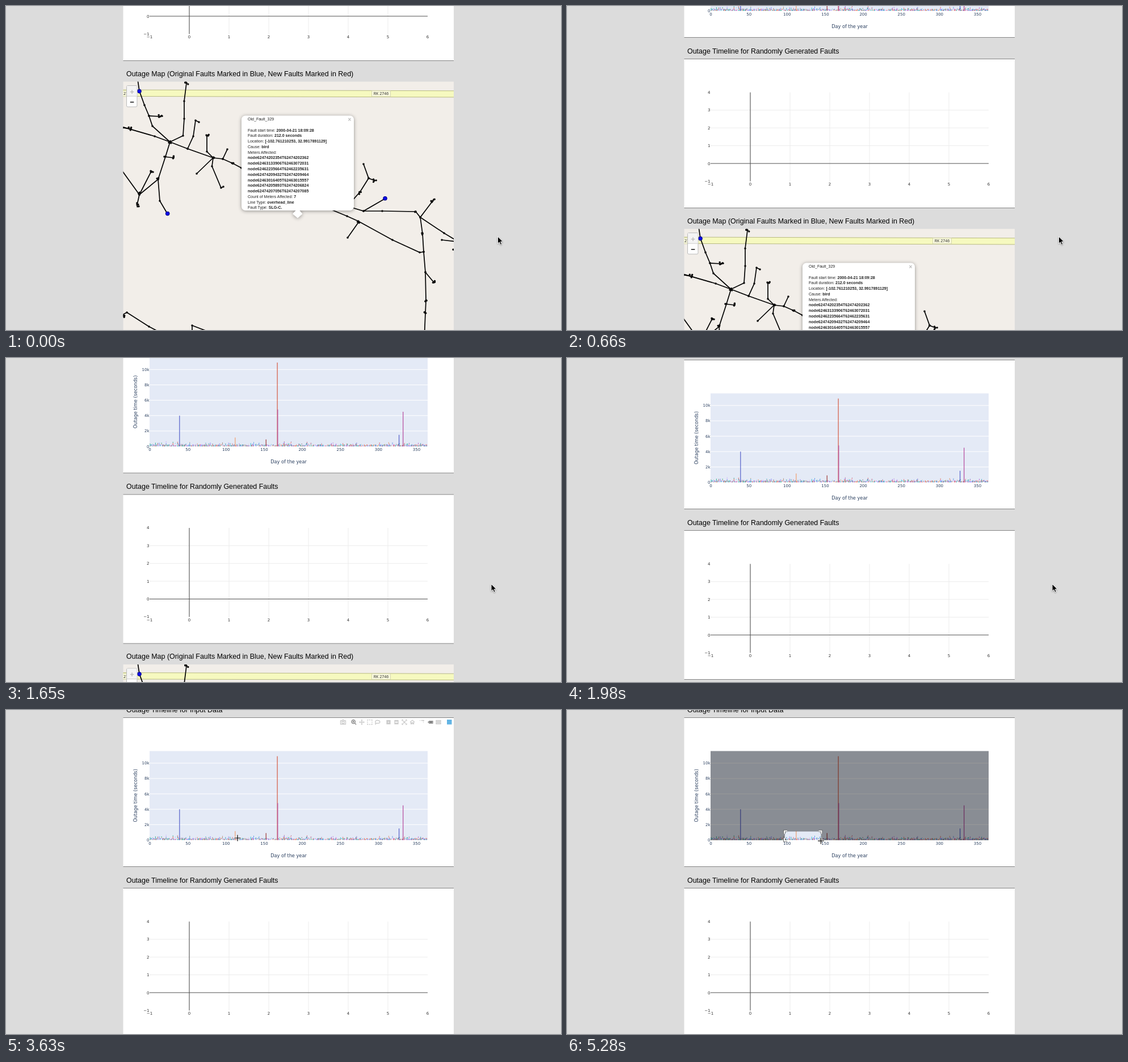
These frames come from a looping animation (978x572 px, 5610 ms). An HTML page:

```html
<!DOCTYPE html>
<html>
<head>
<meta charset="utf-8">
<title>Outage dashboard</title>
<style>
html, body { margin: 0; width: 100%; height: 100%; overflow: hidden; background: #dcdcdc; }
svg { display: block; }
text { white-space: pre; }
.head { font: 12.45px "Liberation Sans", Arial, sans-serif; }
.tick { font: 7px "DejaVu Sans", Verdana, sans-serif; }
.axis { font: 8.2px "DejaVu Sans", Verdana, sans-serif; }
.pop { font: 7.05px "Liberation Sans", Arial, sans-serif; fill: #222; }
.road { font: 7px "Noto Sans", sans-serif; fill: #333; }
.zoom { font: bold 13px "Liberation Sans", Arial, sans-serif; }
b, .bold { font-weight: bold; }
.shadow { filter: drop-shadow(0 1.5px 3px rgba(0,0,0,.4)); }
.cursor { filter: drop-shadow(0 1px 1px rgba(0,0,0,.35)); }
</style>
</head>
<body>
<svg id="stage" width="978" height="572" viewBox="0 0 978 572"><g id="page"></g></svg>
<script>
const NS = 'http://www.w3.org/2000/svg';
const stage = document.getElementById('stage');
const page = document.getElementById('page');

function el(parent, name, attrs = {}, content) {
  const e = document.createElementNS(NS, name);
  for (const k in attrs) e.setAttribute(k, attrs[k]);
  if (content !== undefined) e.textContent = content;
  return parent.appendChild(e);
}
const rect = (p, x, y, width, height, fill, more) => el(p, 'rect', {x, y, width, height, fill, ...more});
const path = (p, d, stroke, width = 1, fill = 'none') =>
  el(p, 'path', {d, stroke, 'stroke-width': width, fill});
const text = (p, x, y, cls, s, anchor = 'start', fill = '#000') =>
  el(p, 'text', {x, y, class: cls, 'text-anchor': anchor, fill}, s);

let seed = 7;
function rnd() {
  seed = (seed * 16807) % 2147483647;
  return seed / 2147483647;
}

const LEFT = 206.5, WIDTH = 582.5;

function panel(y, title) {
  text(page, 212, y - 9.8, 'head', title);
  const g = el(page, 'g', {transform: `translate(0 ${y})`});
  rect(g, LEFT, 0, WIDTH, 263, '#fff');
  path(g, `M${LEFT} 0h${WIDTH}m0 263h-${WIDTH}`, '#858585');
  return g;
}

// Toolbar icons, each drawn around its own centre
const icons = {
  camera: 'M-4.5-2.5h2.5l1-1.5h2l1 1.5h2.5v6h-9zM-2 .5a2 2 0 1 0 4 0a2 2 0 1 0-4 0',
  zoom: 'M-4-.8a3.2 3.2 0 1 0 6.4 0a3.2 3.2 0 1 0-6.4 0M1.5 1.6L4 4.2M-2.5-.8h3.4M-.8-2.5v3.4',
  pan: 'M-4 0h8M0-4v8M-3-1l-1 1l1 1M3-1l1 1l-1 1M-1-3l1-1l1 1M-1 3l1 1l1-1',
  select: 'M-4-4h1.5m1.5 0h2m1.5 0h1.5v1.5m0 1.5v2m0 1.5v1.5h-1.5m-1.5 0h-2m-1.5 0h-1.5v-1.5m0-1.5v-2m0-1.5v-1.5',
  lasso: 'M-3 2c-3-3 0-6 4-5s4 5-1 5h-3c-2 0-1 2 0 2',
  plus: 'M-3-3h6v6h-6zM-3-1.5h6M-3 1.5h6M-1.5-3v6M1.5-3v6',
  minus: 'M-3-3h6v6h-6zM-3-1.7h6M-3 1.7h6',
  auto: 'M-4-2v-2h2M2-4h2v2M4 2v2h-2M-2 4h-2v-2M-2.5-2.5l5 5M2.5-2.5l-5 5',
  home: 'M-4 0L0-3.5L4 0M-2.5 0v3h1.5v-2h2v2h1.5v-3',
  spike: 'M-4-3h1m1.5 0h4v1.5m0 1.5v1M1-3h3',
  closest: 'M-4 0l2-1.8h6v3.6h-6zM-2-.5h5M-2 .5h5',
  compare: 'M-4-3h8v2h-8zM-4 1h8v2h-8z'
};
function toolbar(g, items, logo) {
  const bar = el(g, 'g', {transform: 'translate(0 8)'});
  for (const [x, name] of items) {
    const dark = name === 'zoom' || name === 'closest';
    path(bar, icons[name], dark ? '#858585' : '#cbcbcb', 1.3).setAttribute('transform', `translate(${x} 0)`);
  }
  rect(bar, 777, -4.5, 8.5, 8.5, logo);
  return bar;
}

// Bar chart
const bars = panel(0, 'Outage Timeline for Input Data');
const INK = '#2a3f5f', BASE = 216, KILO = 13.57;
const dayX = d => 253.5 + d * 1.343;
rect(bars, 253, 59, 490, 157.5, '#e4eaf6');
for (let k = 0; k <= 10; k += 2) {
  const y = BASE - k * KILO;
  path(bars, `M253 ${y}h490`, '#fff');
  text(bars, 252.5, y + 2.5, 'tick', k ? k + 'k' : '0', 'end', INK);
}
const hues = ['#636efa', '#ef553b', '#00a884', '#ab63fa', '#e08a4a', '#19b3d3', '#d8567c', '#54607a'];
for (let d = 0; d < 364; d++) {
  let h = 1.5 + 2 * rnd() + 5.5 * rnd() ** 5;
  for (let y = BASE; h > 0; h -= 1.6, y -= 1.6) {
    const fill = hues[Math.floor(rnd() * hues.length)];
    if (rnd() < .8) rect(bars, dayX(d), y - Math.min(h, 1.6), .85, Math.min(h, 1.6), fill);
  }
}
const spikes = [[38.5, 4, '#5560c8'], [111.5, 1.15, '#f0a070'], [152, .9, '#a03c38'], [166.8, 10.9, '#d65a42'],
  [167.3, 4.8, '#b5489c'], [326.5, 1.5, '#5560c8'], [331.8, 4.5, '#b5489c']];
for (const [d, k, fill] of spikes) rect(bars, dayX(d), BASE - k * KILO, 1.2, k * KILO, fill);
for (let d = 0; d <= 350; d += 50) text(bars, dayX(d), 224, 'tick', d, 'middle', INK);
text(bars, 498, 246.4, 'axis', 'Day of the year', 'middle', INK);
text(bars, 0, 0, 'axis', 'Outage time (seconds)', 'middle', INK)
  .setAttribute('transform', 'translate(231 137.5) rotate(-90)');
const barTools = toolbar(bars, [[594, 'camera'], [613, 'zoom'], [627, 'pan'], [641, 'select'], [655, 'lasso'],
  [674, 'plus'], [688, 'minus'], [702, 'auto'], [716, 'home'], [733, 'spike'], [748, 'closest'], [762, 'compare']], '#62b4e4');
const dim = el(bars, 'path', {fill: 'rgba(0,0,0,.4)', 'fill-rule': 'evenodd'});
const cornersBack = path(bars, '', '#555', 3.6);
const corners = path(bars, '', '#fff', 2);

// Empty chart
const blank = panel(301, 'Outage Timeline for Randomly Generated Faults');
const ZERO = 184.5, UNIT = 31.4;
for (let i = -1; i <= 6; i++) {
  const x = 323 + 70 * i, y = ZERO - UNIT * i, label = String(i).replace('-', '\u2212');
  if (i > 0 && i < 6) path(blank, `M${x} 59V216`, '#ececec');
  if (i > 0 && i < 4) path(blank, `M253 ${y}h490`, '#ececec');
  text(blank, x, 223.5, 'tick', label, 'middle', '#333');
  if (i < 5) text(blank, 252.5, y + 2.5, 'tick', label, 'end', '#333');
}
path(blank, `M253 ${ZERO}h490M323 59V216`, '#505050', 1.1);
const blankTools = toolbar(blank, [[669, 'camera'], [688, 'zoom'], [702, 'pan'], [720, 'plus'], [734, 'minus'],
  [748, 'auto'], [762, 'home']], '#2a9fe0');

// Map
text(page, 212, 591.3, 'head', 'Outage Map (Original Faults Marked in Blue, New Faults Marked in Red)');
const map = el(page, 'svg', {x: LEFT, y: 601, width: WIDTH, height: 500, viewBox: `${LEFT} 133.5 ${WIDTH} 500`});
rect(map, 200, 133, 600, 520, '#f2eee9');
path(map, 'M200 148L795 149.8V161L200 159.4z', '#b9bb82', 1, '#f6f9bf');
for (const [x, w] of [[195, 19], [644.5, 33]]) rect(map, x, 149.7, w, 10.2, '#f8f8dc', {stroke: '#cfd0a8', 'stroke-width': .8});
text(map, 207, 157.3, 'road', '27');
text(map, 661, 157.4, 'road', 'RK 2746', 'middle');

// A trailing * marks a cluster at the end of a line
const west = ['232,130 235,150 244,175 252,194 258,212 289,240 281,266 268,306 235,333 231,351*',
  '252,194 272,195*', '200,212 262,230 289,240 320,252 365,268 382,270 400,278 415,286 572,359',
  '206,215 219,217*', '289,240 312,229 314,199 314,168 318,136*', '320,252 330,230 334,202 340,205',
  '365,268 354,257 354,229*', '336,296 365,268 363,283 379,321 383,319', '382,270 390,253',
  '279,266 295,268*', '235,333 204,290', '235,333 256,292*', '268,306 271,344 284,366',
  '200,548 213,541 252,566 275,578', '204,545 208,547*', '328,580 328,564 362,577'];
const east = ['572,359 601,371 621,380 681,413 729,435 736,434', '621,382 602,409', '630,279 639,304 649,308*',
  '639,304 624,328 600,355', '600,353 630,362 668,340', '630,362 663,362 722,363 730,373 752,344*',
  '730,373 772,401 795,415', '768,413 795,416', '730,373 734,402 736,434 739,470 740,520 739,542 737,590',
  '739,470 754,488*', '788,430 792,430'];
const node = (x, y, r, fill = '#0a0a0a') => el(map, 'circle', {cx: x, cy: y, r, fill});
for (const line of [...west, ...east]) {
  const pts = line.replace('*', '').split(' ').map(p => p.split(',').map(Number));
  path(map, 'M' + pts.join('L'), '#000', 1.7);
  for (const [x, y] of pts) node(x, y, 1.8);
  if (line.endsWith('*')) {
    const [x, y] = pts[pts.length - 1];
    for (let i = 0; i < 4; i++) node(x + 7 * rnd() - 3.5, y + 6 * rnd() - 3, 1.7);
  }
}
for (const [x, y] of [[289, 240], [365, 269], [621, 382], [624, 330], [722, 362], [734, 402], [740, 521], [739, 541], [268, 304], [400, 277], [235, 331]])
  for (let i = 0; i < 3; i++) node(x + 4 * rnd() - 2, y + 4 * rnd() - 2, 1.7);
for (const [x, y] of [[235, 150.5], [284.7, 366.5], [668, 339.7]]) node(x, y, 3.4, '#0808e8').setAttribute('stroke', '#000080');

// Zoom buttons
rect(map, 212.5, 140.5, 18.5, 37.5, '#fff', {rx: 2, stroke: '#bbb', 'fill-opacity': .96});
rect(map, 213, 141, 17.5, 18, '#f4f4f4');
path(map, 'M213 159.2h17.5', '#ccc');
text(map, 222, 155.5, 'zoom', '+', 'middle', '#bbb');
text(map, 222, 173.5, 'zoom', '\u2212', 'middle');

// Popup
const popup = el(map, 'g', {class: 'shadow'});
path(popup, 'M505 367L511 360.5H517L522.5 367L514 374.5z', 'none', 0, '#fff');
rect(popup, 415, 193.5, 198, 167.5, '#fff', {rx: 7});
const facts = ['Old_Fault_329', '', 'Fault start time: |2000-04-21 18:09:28', 'Fault duration: |212.0 seconds',
  'Location: |[-102.761210253, 32.9917891129]', 'Cause: |bird', 'Meters Affected:',
  '|node62474202354T62474202362', '|node62463133906T62463072031', '|node62462235664T62462235631',
  '|node62474209432T62474209464', '|node62463016405T62463015557', '|node62474205893T62474206824',
  '|node62474207056T62474207085', 'Count of Meters Affected: |7', 'Line Type: |overhead_line', 'Fault Type: |SLG-C.'];
facts.forEach((fact, i) => {
  const [label, value = ''] = fact.split('|');
  const t = text(map, 426, 202 + i * 9.78, 'pop', label);
  el(t, 'tspan', {class: 'bold'}, value);
});
text(map, 605.5, 203.8, 'zoom', '×', 'middle', '#bbb').style.fontSize = '10px';

// Pointers
const arrow = el(stage, 'g', {class: 'cursor'});
path(arrow, 'M0 0V12.6L2.9 9.9L5 14.6L7.2 13.6L5.2 9.1H9.2z', '#fff', 1, '#000');
const cross = el(stage, 'g');
path(cross, 'M-6 0H6M0-6V6', 'rgba(255,255,255,.8)', 3);
path(cross, 'M-5.5 0H5.5M0-5.5V5.5', '#000', 1.2);

// Each step: page offset, pointer x, pointer y, state
const STEP = 330;
const steps = [
  [-467.5, 866.5, 407], [-458, 866.5, 407], [-207.5, 866.5, 407], [-194, 862, 403], [-178.5, 855, 399],
  [-60, 855, 399], [3.5, 855, 399], [5, 828, 386], [7, 620, 330, 'blank'], [9.2, 440, 249, 'blank'],
  [12, 428, 238, 'bars'], [13.5, 408, 226, 'cross'], [13.5, 398, 223, 'cross'], [13.5, 394, 222, 'cross'],
  [13.5, 384, 215, 'cross'], [13.5, 420, 224, 'drag'], [13.5, 447.5, 231, 'drag']
];
const show = (e, on) => e.setAttribute('display', on ? 'inline' : 'none');
const START = {x: 384, y: 201};

function selection(x, y) {
  y = Math.min(y, 216.5);
  const {x: a, y: b} = START, n = 4;
  dim.setAttribute('d', `M253 59H743V216.5H253zM${a} ${b}H${x}V${y}H${a}z`);
  const d = `M${a - 1} ${b + n}V${b - 1}H${a + n}M${x - n} ${b - 1}H${x + 1}V${b + n}` +
    `M${x + 1} ${y - n}V${y + 1}H${x - n}M${a + n} ${y + 1}H${a - 1}V${y - n}`;
  corners.setAttribute('d', d);
  cornersBack.setAttribute('d', d);
}

let last = -1;
function frame() {
  const i = Math.floor(performance.now() / STEP) % steps.length;
  if (i !== last) {
    last = i;
    const [offset, x, y, state] = steps[i];
    const drag = state === 'drag', crossed = drag || state === 'cross';
    page.setAttribute('transform', `translate(0 ${offset})`);
    for (const p of [arrow, cross]) p.setAttribute('transform', `translate(${x} ${y})`);
    show(arrow, !crossed);
    show(cross, crossed);
    show(barTools, state === 'bars' || state === 'cross');
    show(blankTools, state === 'blank');
    for (const e of [dim, corners, cornersBack]) show(e, drag);
    if (drag) selection(x, y - offset);
  }
  requestAnimationFrame(frame);
}
frame();
</script>
</body>
</html>
```
